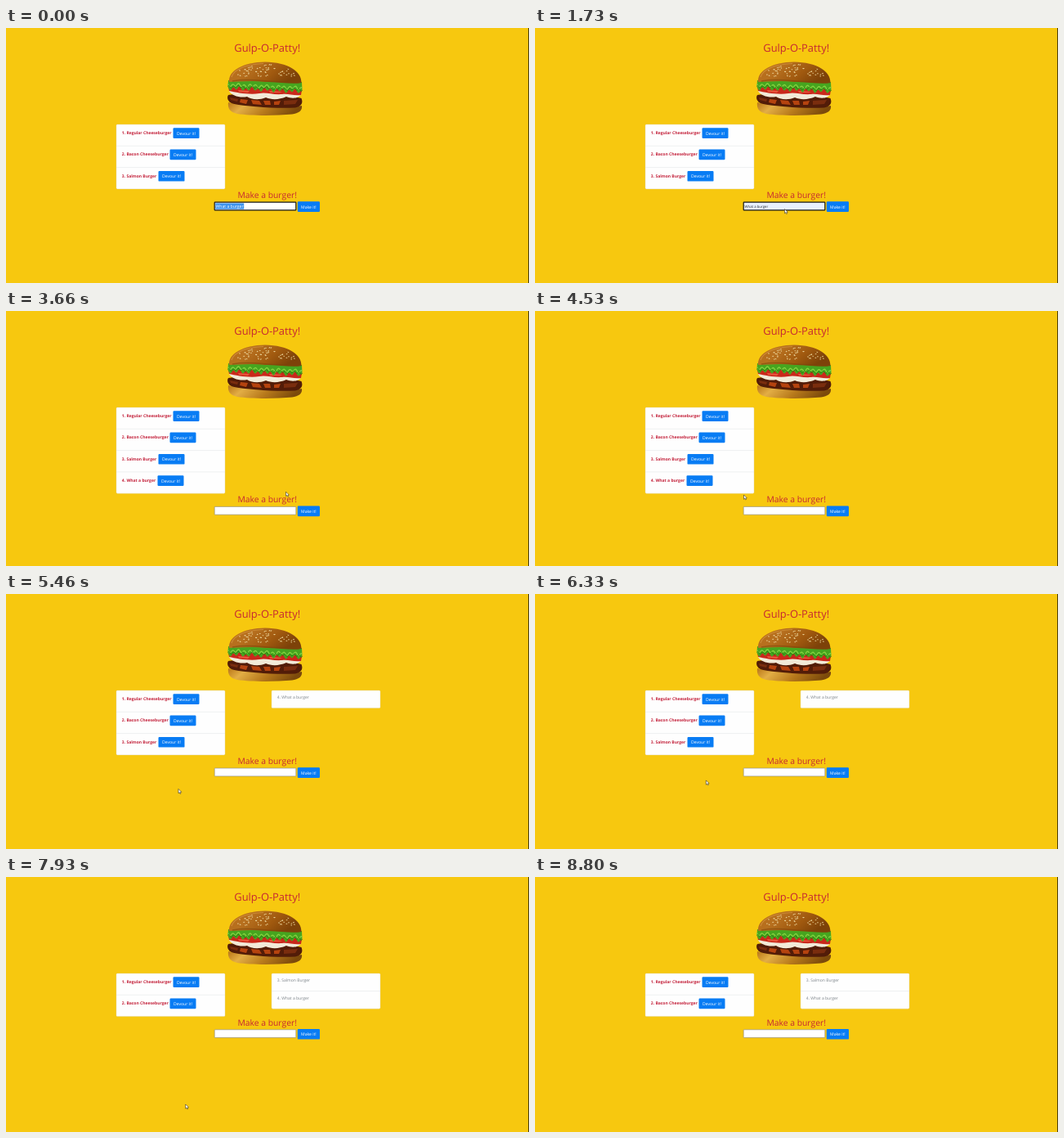
Animation of 640x312 px, one loop 8860 ms. Source, as an HTML page:

```html
<!DOCTYPE html>
<html lang="en">
<head>
<meta charset="utf-8">
<title>Burger list</title>
<style>
  html, body { margin: 0; width: 100%; height: 100%; overflow: hidden; background: #f7c80f; }
  svg { display: block; width: 640px; height: 312px; }
  text { font-family: "Open Sans", "Noto Sans", sans-serif; font-size: 5.1px; text-rendering: geometricPrecision; white-space: pre; }
  .title, .sub { fill: #c62733; font-weight: 500; text-anchor: middle; }
  .title { font-size: 12.9px; }
  .sub { font-size: 10.35px; }
  .item { fill: #c3203a; font-weight: 700; font-size: 5.03px; }
  .eaten { fill: #7b8288; font-size: 5.03px; }
  .label { fill: #fff; text-anchor: middle; }
  .card { fill: #fefefe; stroke: #dfd7b8; stroke-width: .4; }
  .rule { stroke: #dfe1e2; stroke-width: .5; }
</style>
</head>
<body>
<svg viewBox="0 0 640 312">
  <defs>
    <linearGradient id="top" x1="0" y1="0" x2="1" y2=".35">
      <stop offset="0" stop-color="#b96c17"/>
      <stop offset=".35" stop-color="#b7701f"/>
      <stop offset=".7" stop-color="#a0590f"/>
      <stop offset="1" stop-color="#7d4209"/>
    </linearGradient>
    <linearGradient id="base" x1="0" y1="0" x2="1" y2=".2">
      <stop offset="0" stop-color="#b97617"/>
      <stop offset=".25" stop-color="#e3ae45"/>
      <stop offset=".6" stop-color="#b87a1c"/>
      <stop offset="1" stop-color="#7c4a0b"/>
    </linearGradient>
  </defs>
  <rect width="640" height="312" fill="#f7c80f"/>
  <rect x="639" width="1" height="312" fill="#4a3d0c"/>
  <text class="title" x="319.7" y="29">Gulp-O-Patty!</text>
  <g id="burger">
    <path fill="url(#base)" d="M272 91C285 96 340 99 362 95C363 101 358 104.500 350 105.500C330 107.500 300 107.500 283 105C274 103 271 98 272 91Z"/>
    <path fill="#521c08" d="M272 82C285 79 350 82 361.500 86C364 92 361 96 354 97.500C330 98.500 295 96.500 277 92.500C271 90 270 85 272 82Z"/>
    <path fill="#b5430f" d="M287 87l9 1-2 5-8-2zM300 88l10 1 3 5-11-1zM315 89l8 0 1 5-7 0zM328 90l8-1-2 5-6 0z"/>
    <path fill="#7a2d0e" d="M274 85l10 2-1 3-8-2zM340 89l17-1-3 5-14 1z"/>
    <path fill="#f2ead8" d="M273 77C288 74 345 76 361 81C359 86 350 87 343 84C334 88 325 88 318 85C309 89 299 87 295 84C287 86 276 83 273 77Z"/>
    <path fill="#c9281b" d="M272 72C290 70 345 71 362 76L361 82C352 83 345 80 338 81C326 82 318 78 310 80C298 82 282 79 273 77Z"/>
    <path fill="#e9563c" d="M284 76l14 1-2 2-11-1zM322 77l16 1-3 1-12 0z"/>
    <path id="leaf" fill="#46a51f"/>
    <path id="vein" fill="none" stroke="#83d240" stroke-width="1.300"/>
    <path id="shade" fill="none" stroke="#23740f" stroke-width=".8"/>
    <path fill="url(#top)" d="M273 66C272 52 290 42 317 41.500C345 42 362 53 361.500 67C350 69.500 333 65.500 317 66C300 64 284 66 273 66Z"/>
    <path fill="none" stroke="#d99b45" stroke-width="1.200" opacity=".65" d="M276 60C279 50 295 44 315 43.500"/>
    <path fill="none" stroke="#7c450c" stroke-width="1.500" opacity=".55" d="M277 65C293 62 307 64 319 65S347 66 359 66"/>
    <g id="seeds" fill="#eed9a0"/>
  </g>
  <g id="page"></g>
  <circle id="ring" fill="none" stroke="#df4d16" stroke-width="1.100"/>
  <g id="pointer">
    <path id="arrow" fill="#fff" stroke="#2b2618" stroke-width=".55" d="M0 0L0 5.300L1.200 4.200L2.100 6L3 5.600L2.200 3.900L3.800 3.800Z"/>
    <path id="hand" fill="#fff" stroke="#263447" stroke-width=".45" d="M-.7 .5Q0-.5 .7 .5V2.700L3 3.200Q3.700 3.500 3.600 4.500L3 7H-.5L-2.200 4.300Q-2.100 3.300-.7 4.200Z"/>
  </g>
</svg>
<script>
const LOOP = 8860, ROW = 26.3, EATEN_ROW = 21.6, TOP = 118;
const $ = id => document.getElementById(id);
const names = ["Regular Cheeseburger", "Bacon Cheeseburger", "Salmon Burger", "What a burger"];
const buttonX = [204.5, 200.5, 186.5, 185.5];

// at: start time; left: burgers to eat; eaten: finished ones; field: input look; hot: hovered button
const phases = [
  { at: 0, left: 3, field: "selected" },
  { at: 1530, left: 3, field: "preview" },
  { at: 2000, left: 3, field: "filled" },
  { at: 2700, left: 3, field: "filled", hot: "make" },
  { at: 2930, left: 3, field: "blurred", hot: "make" },
  { at: 3330, left: 4 },
  { at: 4800, left: 4, hot: 3 },
  { at: 4960, left: 4, hot: 3, focus: true },
  { at: 5200, left: 3, eaten: [3] },
  { at: 6780, left: 3, eaten: [3], hot: 2 },
  { at: 7060, left: 3, eaten: [3], hot: 2, focus: true },
  { at: 7330, left: 2, eaten: [2, 3] }
];

// time, x, y of the pointer tip
const track = [
  [1530, 309, 219], [1730, 305.5, 221.5], [2000, 305.5, 221.5], [2400, 312, 221],
  [2750, 363, 213.5], [3330, 363, 213.5], [3900, 330, 226], [4530, 255.5, 225],
  [4850, 201, 206], [5200, 201, 206], [5460, 211, 238.5], [6130, 211, 238.5],
  [6850, 202, 183], [7400, 202, 183], [8200, 226, 312]
];
const clicks = [[2880, 363, 213], [4960, 201, 206], [7150, 202, 183]];

function drawBurger() {
  let seed = 11;
  const rnd = () => (seed = seed * 16807 % 2147483647) / 2147483647;
  let seeds = "";
  for (let i = 0; i < 58; i++) {
    const a = Math.PI * (1 + rnd()), r = Math.sqrt(rnd());
    const x = 317 + 36 * r * Math.cos(a), y = 59 + 15 * r * Math.sin(a);
    seeds += `<ellipse rx=".95" ry=".5" transform="translate(${x} ${y}) rotate(${rnd() * 80 - 40})"/>`;
  }
  $("seeds").innerHTML = seeds;

  const frill = (y, amp, k) => {
    const pts = [];
    for (let x = 271.5; x <= 362.5; x += .7)
      pts.push(`${x} ${y + (x - 272) * .045 + amp * Math.sin(x * k) + amp * .5 * Math.sin(x * .37)}`);
    return pts;
  };
  $("leaf").setAttribute("d", "M" + frill(73.5, 1.9, .83).join("L") + "L362 66L317 63L272 64Z");
  $("vein").setAttribute("d", "M" + frill(69.5, 1.5, .9).join("L"));
  $("shade").setAttribute("d", "M" + frill(71.5, 1.3, 1.1).join("L"));
}

const rect = (x, y, w, h, fill, extra = "") =>
  `<rect x="${x}" y="${y}" width="${w}" height="${h}" fill="${fill}" ${extra}/>`;
const text = (cls, x, y, s, extra = "") => `<text class="${cls}" x="${x}" y="${y}" ${extra}>${s}</text>`;

function button(x, y, w, label, hot, focus) {
  const glow = focus ? rect(x - 1, y - 1, w + 2, 14.7, "#80bdff", 'rx="1.8"') : "";
  return glow + rect(x, y, w, 12.7, hot ? "#0a65cc" : "#087cf4", 'rx="1.200"') +
    text("label", x + w / 2, y + 8.3, label);
}

function card(x, count, row) {
  let s = `<rect class="card" x="${x}" y="${TOP}" width="133" height="${count * row}" rx="1.400"/>`;
  for (let i = 1; i < count; i++)
    s += `<path class="rule" d="M${x} ${TOP + i * row}h133"/>`;
  return s;
}

function input(y, look) {
  const focused = ["selected", "preview", "filled"].includes(look);
  const tint = look && look !== "selected" ? "#e8f0fe" : "#fff";
  let s = rect(255.2, y, 99.6, 9.8, tint,
    `rx=".6" stroke="${focused ? "#15171a" : "#85847c"}" stroke-width="${focused ? 1.2 : .6}"`);
  if (!look) return s;
  const chosen = look === "selected";
  if (chosen) s += rect(256.2, y + 1.3, 35, 7.2, "#3d93ee");
  const size = look === "preview" ? 4.3 : 5.1;
  return s + text("", 256.6, y + 6.8, names[3],
    `style="font-size:${size}px" fill="${chosen ? "#fff" : "#25282c"}"`);
}

function drawPage({ left, eaten = [], field, hot, focus }) {
  let s = card(135, left, ROW);
  for (let i = 0; i < left; i++) {
    const y = TOP + i * ROW;
    s += text("item", 141.8, y + 12, `${i + 1}. ${names[i]}`) +
      button(buttonX[i], y + 4.3, 32, "Devour it!", hot === i, hot === i && focus);
  }
  if (eaten.length) s += card(325, eaten.length, EATEN_ROW);
  eaten.forEach((n, i) => {
    s += text("eaten", 331.8, TOP + i * EATEN_ROW + 10.4, `${n + 1}. ${names[n]}`);
  });
  const end = TOP + left * ROW;
  s += text("sub", 319.7, end + 10.9, "Make a burger!") + input(end + 16.2, field) +
    button(356.8, end + 15.3, 27.2, "Make it!", hot === "make");
  $("page").innerHTML = s;
}

function pointerAt(t) {
  const i = track.findIndex(p => p[0] > t);
  if (i < 1) return null;
  const [a, b] = [track[i - 1], track[i]];
  const u = (t - a[0]) / (b[0] - a[0]), e = u * u * (3 - 2 * u);
  return [a[1] + (b[1] - a[1]) * e, a[2] + (b[2] - a[2]) * e];
}

const show = (el, on) => el.setAttribute("visibility", on ? "visible" : "hidden");

let current;
function frame(now) {
  const t = now % LOOP;
  const phase = phases.findLast(p => p.at <= t);
  if (phase !== current) drawPage(current = phase);

  const pos = pointerAt(t), overButton = phase.hot !== undefined;
  show($("arrow"), pos && !overButton);
  show($("hand"), pos && overButton);
  if (pos) $("pointer").setAttribute("transform", `translate(${pos})`);

  const click = clicks.find(c => t >= c[0] && t < c[0] + 180);
  show($("ring"), click);
  if (click) {
    $("ring").setAttribute("cx", click[1]);
    $("ring").setAttribute("cy", click[2]);
    $("ring").setAttribute("r", 3 + (t - click[0]) / 15);
  }
  requestAnimationFrame(frame);
}

drawBurger();
const start = performance.now();
requestAnimationFrame(now => frame(Math.max(0, now - start)));
</script>
</body>
</html>
```
